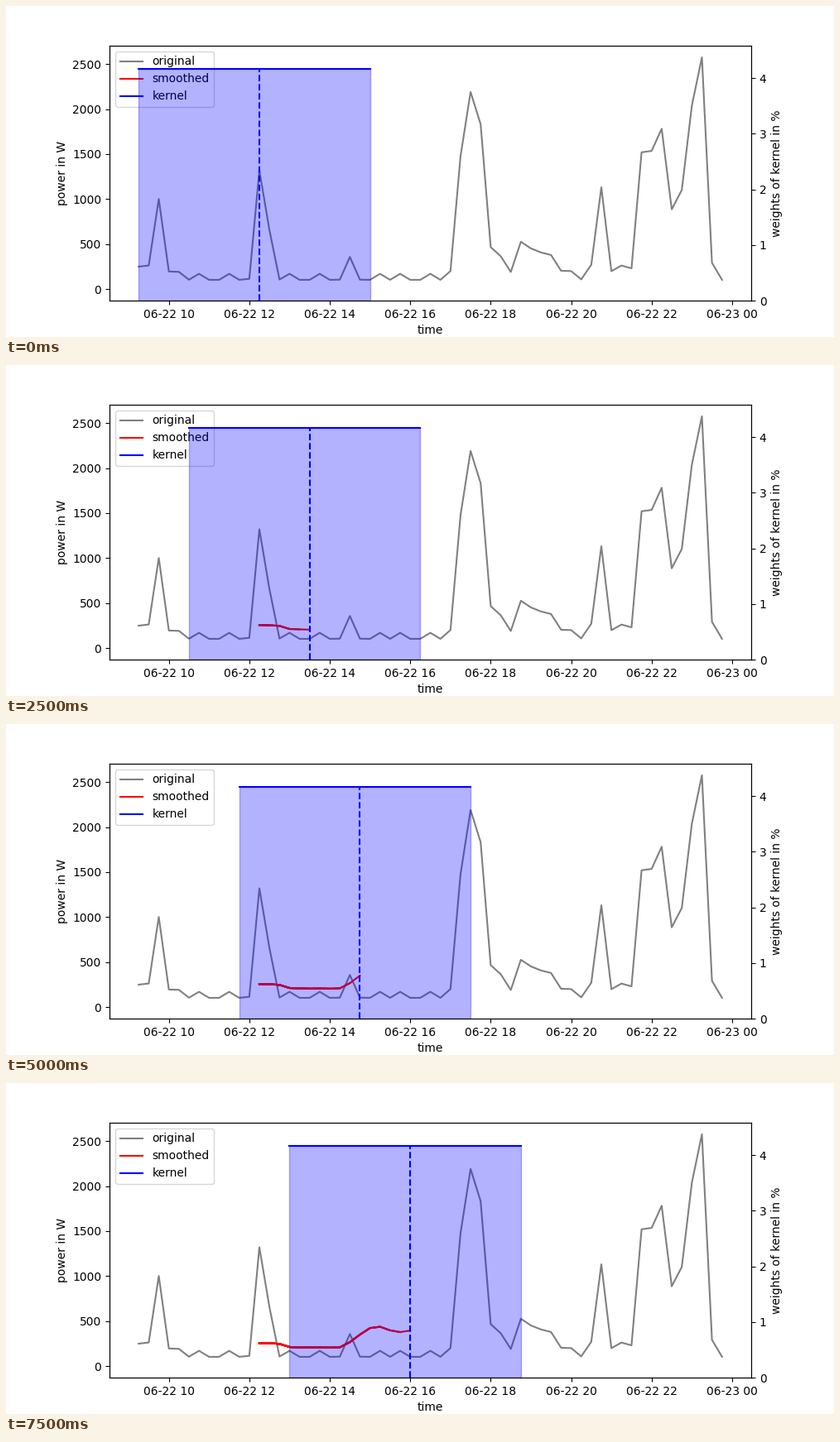
Write a matplotlib script that moves like this. It is 1000 px wide and 400 px high and loops after 8 s.

```python
import numpy as np
import matplotlib.pyplot as plt
from matplotlib.animation import FuncAnimation

FRAMES = 16
INTERVAL = 500
WIDTH = 24            # kernel length in samples
HALF = WIDTH // 2
WEIGHT = 100 / WIDTH  # weight of each sample in %

quarter = np.arange(59)  # one sample per quarter of an hour
hours = 9.25 + quarter / 4


def bump(center, watts, rise=0.6, fall=None):
    """Load with a flat top that fades out within rise and fall samples."""
    d = quarter - center
    reach = np.where(d < 0, rise, fall or rise)
    return watts * np.exp(-np.abs(d / reach) ** 3)


def household():
    power = np.full(len(quarter), 102.0)
    # a fridge that switches on at a steady pace
    cycles = np.rint(3.58 + 2.85 * np.arange(19)).astype(int)
    power[cycles] += 67
    morning = bump(1, 152, 3, 2.4) + bump(2, 757)
    midday = bump(12, 1150, 0.6, 1.11) + bump(21, 187)
    dinner = bump(33.15, 2090, 1.48) + bump(36, 260, 0.5, 0.96)
    evening = bump(38, 356, 0.6, 3.7) + bump(46, 961, 0.83, 0.5)
    night = (bump(47.8, 160, 1) + bump(50.5, 1640, 0.95) + bump(52, 1550)
             + bump(53.5, 870, 1) + bump(56, 2473, 1.5, 0.73))
    return power + morning + midday + dinner + evening + night


def padded(low, high, share=0.05):
    pad = share * (high - low)
    return low - pad, high + pad


def hour_label(hour):
    return f"06-{22 + hour // 24} {hour % 24:02d}"


power = household()
smooth = np.convolve(power, np.ones(WIDTH) / WIDTH, mode="valid")

plt.rcParams["font.family"] = "DejaVu Sans"
fig, ax = plt.subplots(figsize=(10, 4), dpi=100)

ax.plot(hours, power, color="gray", label="original")
# Each step lays a longer curve over the earlier ones.
curves = [
    ax.plot(hours[HALF:HALF + n + 1], smooth[:n + 1], color="red")[0]
    for n in range(FRAMES)
]
curves[0].set_label("smoothed")
ax.plot([], [], color="blue", label="kernel")
ax.set_xlim(padded(hours[0], hours[-1]))
ax.set_ylim(padded(0, power.max()))
ticks = range(10, 25, 2)
ax.set_xticks(ticks, [hour_label(h) for h in ticks])
ax.set_yticks(range(0, 2501, 500))
ax.set_xlabel("time")
ax.set_ylabel("power in W")
ax.legend(loc="upper left")

kernel_ax = ax.twinx()
kernel_ax.set_ylim(0, 1.1 * WEIGHT)
kernel_ax.set_yticks(range(5))
kernel_ax.set_ylabel("weights of kernel in %")
area = kernel_ax.fill_between(hours[:WIDTH], WEIGHT, color="blue", alpha=0.3)
top, = kernel_ax.plot([], [], color="blue")
center, = kernel_ax.plot([], [], color="blue", linestyle="--")


def draw(step):
    left, right = hours[step], hours[step + WIDTH - 1]
    middle = hours[step + HALF]
    area.set_verts([[(left, 0), (left, WEIGHT), (right, WEIGHT), (right, 0)]])
    top.set_data([left, right], [WEIGHT, WEIGHT])
    center.set_data([middle, middle], [0, WEIGHT])
    for n, curve in enumerate(curves):
        curve.set_visible(n <= step)
    return [area, top, center, *curves]


anim = FuncAnimation(fig, draw, frames=FRAMES, interval=INTERVAL,
                     init_func=lambda: draw(0), repeat=True, repeat_delay=0)
plt.show()
```
